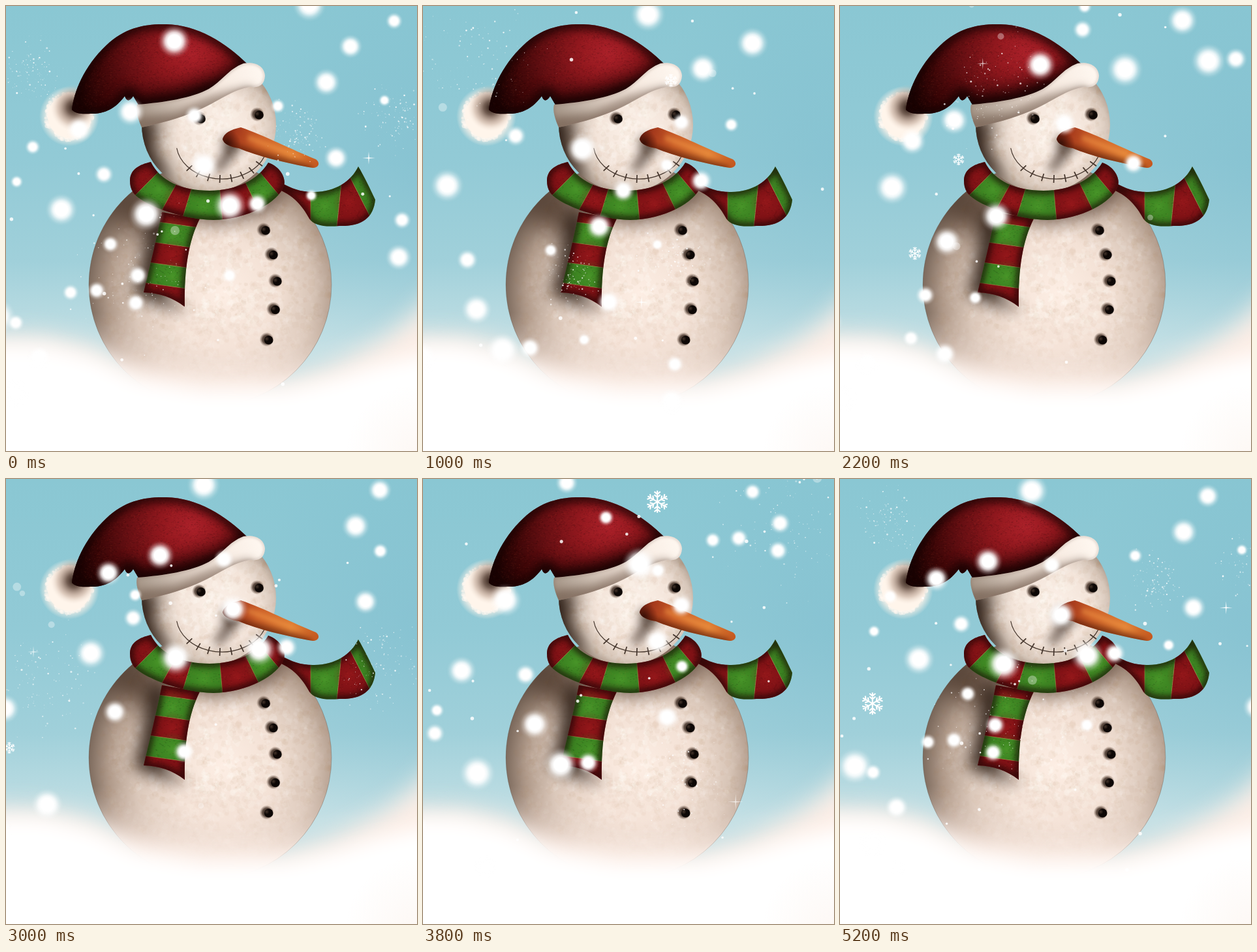
An HTML page with a canvas that plays this animation: 630x682 px, repeating every 5400 ms.

```html
<!DOCTYPE html>
<html lang="en">
<head>
<meta charset="utf-8">
<title>Snowman</title>
<style>
html, body { margin: 0; width: 100%; height: 100%; overflow: hidden; background: #8ec9d5; }
canvas { display: block; }
</style>
</head>
<body>
<canvas id="stage" width="630" height="682"></canvas>
<script>
const W = 630, H = 682, STEP = 200, STEPS = 27;
const SPEED = 44.2, LOOP = 1185; // diagonal drift per step, and per loop
const stage = document.getElementById('stage').getContext('2d');
const scene = document.createElement('canvas');
scene.width = W; scene.height = H;
const g = scene.getContext('2d');

let seed = 7;
const rand = () => (seed = (seed * 16807) % 2147483647) / 2147483647;
const spread = () => rand() + rand() + rand() - 1.5;

function blend(grad, stops) {
  stops.forEach(([o, col]) => grad.addColorStop(o, col));
  return grad;
}
const radial = (c, x, y, r, stops) => blend(c.createRadialGradient(x, y, 0, x, y, r), stops);
const linear = (x1, y1, x2, y2, stops) => blend(g.createLinearGradient(x1, y1, x2, y2), stops);

function disc(c, x, y, r, fill) {
  c.fillStyle = fill;
  c.beginPath(); c.arc(x, y, r, 0, 7); c.fill();
}
function glow(c, x, y, r, stops) {
  disc(c, x, y, r, radial(c, x, y, r, stops));
}
function blurred(px, fill, path) {
  g.save();
  g.filter = `blur(${px}px)`;
  g.fillStyle = fill;
  g.fill(new Path2D(path));
  g.restore();
}
function inside(path, draw) {
  g.save(); g.clip(path); draw(); g.restore();
}
function ball(x, y, r) {
  const p = new Path2D();
  p.arc(x, y, r, 0, 7);
  return p;
}
function innerShade(path, px, width, color) {
  g.save();
  g.filter = `blur(${px}px)`;
  g.strokeStyle = color;
  g.lineWidth = width;
  g.stroke(path);
  g.restore();
}
// Soft flecks, denser and brighter towards the lit middle
function mottle(cx, cy, r, count) {
  for (let i = 0; i < count; i++) {
    const a = rand() * 6.28, far = Math.sqrt(rand()), s = 2 + rand() * 5;
    const x = cx + Math.cos(a) * far * r, y = cy + Math.sin(a) * far * r;
    g.fillStyle = rand() < .5 ? `rgba(255,252,248,${.22 * (1 - far)})` : 'rgba(165,115,85,.045)';
    g.beginPath();
    for (let k = 0; k < 5; k++) {
      const b = k * 1.256 + rand();
      g.lineTo(x + Math.cos(b) * s, y + Math.sin(b) * s);
    }
    g.fill();
  }
}
function grain(x, y, w, h, count) {
  for (let i = 0; i < count; i++) {
    g.fillStyle = rand() < .4 ? 'rgba(255,110,80,.07)' : 'rgba(0,0,0,.12)';
    g.fillRect(x + rand() * w, y + rand() * h, 2, 1);
  }
}
function coal(x, y) {
  glow(g, x - 2, y - 1, 11, [[0, '#24160f'], [.6, 'rgba(50,32,22,.75)'], [1, 'rgba(90,65,50,0)']]);
  disc(g, x + 1, y, 6.8, '#0d0705');
  glow(g, x - 2, y - 2, 4, [[0, 'rgba(120,95,78,.5)'], [1, 'rgba(120,95,78,0)']]);
}

function drawSky() {
  g.fillStyle = linear(0, 0, 0, 520, [[0, '#8ac7d3'], [.45, '#92cad6'], [.75, '#a0d0da'], [1, '#c4e0e5']]);
  g.fillRect(0, 0, W, H);
  glow(g, 660, 250, 330, [[0, 'rgba(110,178,200,.3)'], [1, 'rgba(110,178,200,0)']]);
}

function drawBody() {
  const body = ball(313, 427, 186);
  inside(body, () => {
    g.fillStyle = radial(g, 332, 440, 208,
      [[0, '#fdeee4'], [.4, '#f3e1d5'], [.66, '#d8c5b7'], [.84, '#b09a8a'], [1, '#79675a']]);
    g.fillRect(100, 220, 430, 420);
    mottle(325, 435, 184, 2000);
    blurred(20, 'rgba(62,42,30,.75)', 'M150 300 L200 270 L250 320 L238 350 L180 340 Z');
    blurred(12, 'rgba(70,48,35,.6)', 'M220 282 L250 318 L320 336 L400 318 L438 280 L340 250 Z');
    blurred(12, 'rgba(40,26,17,.9)', 'M222 312 L250 320 L245 440 L276 470 L196 444 Q210 390 216 330 Z');
    g.fillStyle = linear(0, 470, 0, 585, [[0, 'rgba(245,225,213,0)'], [1, 'rgba(252,238,230,.85)']]);
    g.fillRect(100, 470, 430, 200);
  });
  g.strokeStyle = 'rgba(95,85,75,.35)';
  g.lineWidth = 1;
  g.stroke(body);
  for (let i = 0; i < 5; i++) coal(397 + 18 * Math.sin(i * .72), 344 + 36 * i + 1.5 * i * i);
}

function drawHead() {
  inside(ball(311, 182, 103), () => {
    g.fillStyle = radial(g, 325, 195, 120,
      [[0, '#fdf2ea'], [.5, '#f3e4d9'], [.72, '#d6c6b9'], [.88, '#9d8c7e'], [1, '#4a3b31']]);
    g.fillRect(200, 70, 230, 230);
    mottle(311, 182, 102, 700);
    blurred(13, 'rgba(40,27,19,.85)', 'M190 175 L235 180 L222 215 L250 262 L228 266 L190 230 Z');
    blurred(8, 'rgba(45,28,18,.8)', 'M333 198 L366 208 L352 226 L328 254 L318 252 L334 226 Z');
  });
  coal(298, 173);
  coal(387, 167);
  // stitched smile along an elliptic arc
  g.strokeStyle = '#43342b';
  g.lineWidth = 1.2;
  g.beginPath(); g.ellipse(331, 210, 70, 55, 0, .3, 3); g.stroke();
  g.lineWidth = 1.7;
  for (let i = 0; i < 8; i++) {
    const a = 2.366 - i * .25, x = Math.cos(a), y = Math.sin(a);
    g.beginPath();
    g.moveTo(331 + 64 * x, 210 + 49 * y);
    g.lineTo(331 + 76 * x, 210 + 61 * y);
    g.stroke();
  }
}

function drawNose() {
  inside(new Path2D('M332 204 Q335 191 360 186 C395 198 440 221 475 235 C482 240 480 248 470 248 C430 241 385 230 357 218 Q334 214 332 204Z'), () => {
    g.fillStyle = linear(333, 196, 480, 246, [[0, '#702010'], [.12, '#a63a1c'], [.35, '#cc5f28'], [.7, '#dd7c33'], [1, '#c4571f']]);
    g.fillRect(325, 180, 160, 75);
    blurred(4, 'rgba(80,22,5,.65)', 'M328 206 L360 214 L470 246 L465 262 L340 228 Z');
    blurred(3, 'rgba(255,170,80,.4)', 'M372 197 L460 233 L440 231 L370 206 Z');
    glow(g, 338, 211, 22, [[0, 'rgba(45,12,5,.85)'], [1, 'rgba(60,12,5,0)']]);
  });
}

// Dividing line through a point, tilted from the vertical
function cut(x, y, deg, half = 55) {
  const a = deg * Math.PI / 180, dx = Math.sin(a) * half, dy = Math.cos(a) * half;
  return [x + dx, y + dy, x - dx, y - dy];
}
// Knitted stripes between dividing lines, red and green in turn
function knit(shape, cuts) {
  const path = new Path2D(shape);
  inside(path, () => {
    cuts.slice(1).forEach(([e, f, h, k], i) => {
      const [a, b, c, d] = cuts[i];
      g.fillStyle = i % 2 ? '#3c8422' : '#821216';
      g.beginPath();
      g.moveTo(a, b); g.lineTo(c, d); g.lineTo(h, k); g.lineTo(e, f);
      g.fill();
      const mx = (a + c + e + h) / 4, my = (b + d + f + k) / 4;
      glow(g, mx, my, 26, i % 2
        ? [[0, 'rgba(90,175,50,.4)'], [1, 'rgba(60,130,30,0)']]
        : [[0, 'rgba(175,30,32,.4)'], [1, 'rgba(130,20,20,0)']]);
    });
    g.strokeStyle = 'rgba(165,150,70,.6)';
    g.lineWidth = 1;
    for (const [a, b, c, d] of cuts) { g.beginPath(); g.moveTo(a, b); g.lineTo(c, d); g.stroke(); }
    grain(185, 236, 390, 230, 5000);
    innerShade(path, 5, 11, 'rgba(20,4,2,.7)');
  });
}

function drawScarf() {
  const tail = [], ring = [];
  for (let i = 0; i < 6; i++) tail.push(cut(255, 302 + 32 * i + (i > 4 ? 25 : 0), 82));
  for (const deg of [-72, -45, -29, -17, 5, 26, 40, 68]) {
    const a = deg * Math.PI / 180;
    ring.push(cut(318 + 140 * Math.sin(a), 170 + 140 * Math.cos(a), deg));
  }
  knit('M420 270 C438 280 452 285 470 285 C503 286 529 269 540 246 C549 261 558 280 566 297 C563 326 544 338 511 337 C487 339 472 336 465 326 C454 306 442 292 420 282Z',
    [cut(415, 280, -8), cut(467, 304, 0), cut(510, 310, -6), cut(543, 293, 27), cut(590, 270, 27)]);
  knit('M239 316 L297 326 C280 360 273 403 274 461 C255 446 235 440 211 439 C220 402 231 356 239 316Z', tail);
  knit('M190 268 C190 250 205 243 222 239 C237 269 270 283 312 283 C352 283 386 267 402 240 C420 246 430 264 426 276 C417 301 370 327 318 328 C265 327 206 302 195 286 C191 280 190 274 190 268Z', ring);
}

function drawHat() {
  // fluffy pompom
  glow(g, 97, 169, 46, [[0, '#fff4ea'], [.7, 'rgba(255,244,234,.9)'], [1, 'rgba(255,244,234,0)']]);
  for (let i = 0; i < 160; i++) {
    const a = rand() * 6.28, d = 28 + rand() * 9;
    disc(g, 97 + Math.cos(a) * d, 169 + Math.sin(a) * d, 1 + rand() * 3, 'rgba(255,248,240,.55)');
  }
  disc(g, 97, 169, 33, '#fff5eb');
  glow(g, 104, 156, 36, [[0, '#2b1a13'], [.3, 'rgba(70,45,33,.75)'], [.7, 'rgba(160,125,105,.35)'], [1, 'rgba(240,220,205,0)']]);

  const cap = new Path2D('M101 159 C104 132 119 93 154 60 C182 33 214 27 246 28 C293 29 337 56 370 89 L342 116 L270 145 L204 153 C201 148 198 143 195 138 C190 146 185 147 182 138 C171 153 155 166 130 165 C117 166 106 165 101 159Z');
  inside(cap, () => {
    g.fillStyle = radial(g, 285, 72, 185, [[0, '#aa2029'], [.25, '#92181e'], [.5, '#6c1014'], [.78, '#3e0708'], [1, '#1c0303']]);
    g.fillRect(95, 20, 285, 150);
    grain(100, 25, 275, 145, 5000);
    blurred(15, 'rgba(22,2,2,.9)', 'M170 145 L260 128 L335 104 L365 80 L390 95 L350 150 L190 185 Z');
    innerShade(cap, 7, 16, 'rgba(22,2,2,.8)');
  });
  const brim = new Path2D('M201 151 C242 148 285 141 311 127 C330 116 342 96 364 88 C382 85 396 92 397 107 C396 120 389 126 375 124 C346 128 325 147 292 161 C265 172 237 180 208 186 C203 175 198 160 201 151Z');
  inside(brim, () => {
    g.fillStyle = linear(200, 170, 397, 105, [[0, '#a39384'], [.15, '#b9aa9d'], [.4, '#dccdc1'], [.62, '#f6e9df'], [1, '#fff8f1']]);
    g.fillRect(190, 80, 215, 115);
    blurred(7, 'rgba(95,72,57,.55)', 'M200 192 L270 180 L335 146 L385 128 L370 123 L320 136 L260 163 L200 172 Z');
    innerShade(brim, 2, 3, 'rgba(110,85,70,.3)');
  });
}

function drawGround() {
  blurred(19, '#fdeee6', 'M-90 505 L60 506 L130 522 L200 555 L300 575 L420 574 L500 550 L570 515 L615 484 L680 420 L680 780 L-90 780Z');
  blurred(15, '#fff', 'M-90 518 L60 520 L130 538 L200 572 L300 589 L430 588 L500 572 L570 550 L720 515 L720 780 L-90 780Z');
  glow(g, 630, 690, 110, [[0, 'rgba(252,243,237,.6)'], [1, 'rgba(252,243,237,0)']]);
}

// Each particle sits at (x, y) when the drift equals `at`
const parts = [];
function add(kind, at, x, y, r, alpha = 1, laps = [-LOOP, 0, LOOP]) {
  parts.push({ kind, at, x, y, r, alpha, laps });
}
// A group of flakes, ordered from large to small
function wave(at, size, shrink, points) {
  points.forEach(([x, y], i) => add('puff', at, x, y, size - shrink * i));
}
// Anything strewn evenly over the stage and the whole loop
function strew(kind, count, radius, alpha) {
  for (let i = 0; i < count; i++)
    add(kind, rand() * LOOP, rand() * W, rand() * 500, radius * (.7 + rand() * .6), alpha);
}
function glitter(at, x, y, size) {
  for (let i = 0; i < 110; i++)
    add('dot', at, x + spread() * size, y + spread() * size, .4 + rand() * rand() * 1.2, .35 + rand() * .55);
}

const cluster = [[260, 274], [388, 261], [303, 9], [130, 267], [348, 199], [236, 117], [536, 72],
  [157, 144], [551, 188], [573, 17], [430, 258], [334, 123], [195, 213]];
wave(663, 19, .7, cluster);
wave(1140, 19, .7, cluster);
wave(221, 19, .7, [[951, -488], [345, 13], [244, 219], [505, 57], [429, 96], [440, -90], [376, -58], [381, 606],
  [609, -85], [426, 268], [715, -24], [142, 199], [396, 178], [386, 549], [374, 244]]);
wave(1017, 12, .6, [[43, 183], [370, 245], [367, 287], [307, 268], [328, 197], [267, 271], [209, 48]]);

strew('puff', 10, 8, 1);
strew('dot', 45, 2.2, .85);
strew('dot', 8, 6, .35);
add('crystal', 486, 182, 235, 9, 1, [0]);
add('crystal', 486, 115, 379, 10, 1, [0]);
add('crystal', 840, 359, 35, 17, 1, [0]);
add('star', 0, 556, 233, 10);
add('star', 486, 219, 88, 9, .7);
add('star', 840, 479, 495, 12, .7);

glitter(0, 446, 192, 38);
glitter(0, 600, 170, 50);
glitter(0, 40, 98, 45);
glitter(221, 80, 75, 95);
glitter(486, 240, 135, 75);
glitter(663, 570, 285, 60);
glitter(840, 570, 80, 100);

const puff = document.createElement('canvas');
puff.width = puff.height = 100;
glow(puff.getContext('2d'), 50, 50, 50, [[0, '#fff'], [.38, '#fff'], [.52, 'rgba(255,255,255,.82)'],
  [.72, 'rgba(255,255,255,.32)'], [.88, 'rgba(255,255,255,.08)'], [1, 'rgba(255,255,255,0)']]);

const shapes = {
  puff(x, y, r) {
    const s = r * 1.5;
    stage.drawImage(puff, x - s, y - s, s * 2, s * 2);
  },
  dot(x, y, r) { disc(stage, x, y, r, '#fff'); },
  star(x, y, r) {
    stage.beginPath();
    for (let i = 0; i < 8; i++) {
      const d = i % 2 ? 1 : r, a = i * Math.PI / 4;
      stage.lineTo(x + Math.cos(a) * d, y + Math.sin(a) * d);
    }
    stage.fillStyle = '#fff';
    stage.fill();
  },
  crystal(x, y, r) {
    stage.save();
    stage.translate(x, y);
    stage.strokeStyle = '#fff';
    stage.lineWidth = Math.max(1, r / 8);
    stage.beginPath();
    for (let i = 0; i < 6; i++) {
      stage.moveTo(0, 0); stage.lineTo(0, -r);
      for (const d of [.4, .68]) {
        stage.moveTo(-r * .27, -r * (d + .23));
        stage.lineTo(0, -r * d);
        stage.lineTo(r * .27, -r * (d + .23));
      }
      stage.rotate(Math.PI / 3);
    }
    stage.stroke();
    stage.restore();
  }
};

function render(step) {
  stage.globalAlpha = 1;
  stage.drawImage(scene, 0, 0);
  for (const p of parts) {
    for (const lap of p.laps) {
      const shift = step * SPEED - p.at + lap;
      const x = p.x - shift, y = p.y + shift;
      if (x < -30 || x > W + 30 || y < -30 || y > 610) continue;
      stage.globalAlpha = p.alpha;
      shapes[p.kind](x, y, p.r);
    }
  }
}

drawSky();
drawBody();
drawHead();
drawScarf();
drawNose();
drawHat();
drawGround();

const start = performance.now();
let shown = -1;
function tick(now) {
  const step = Math.floor(Math.max(0, now - start) / STEP) % STEPS;
  if (step !== shown) render(shown = step);
  requestAnimationFrame(tick);
}
render(shown = 0);
requestAnimationFrame(tick);
</script>
</body>
</html>
```
